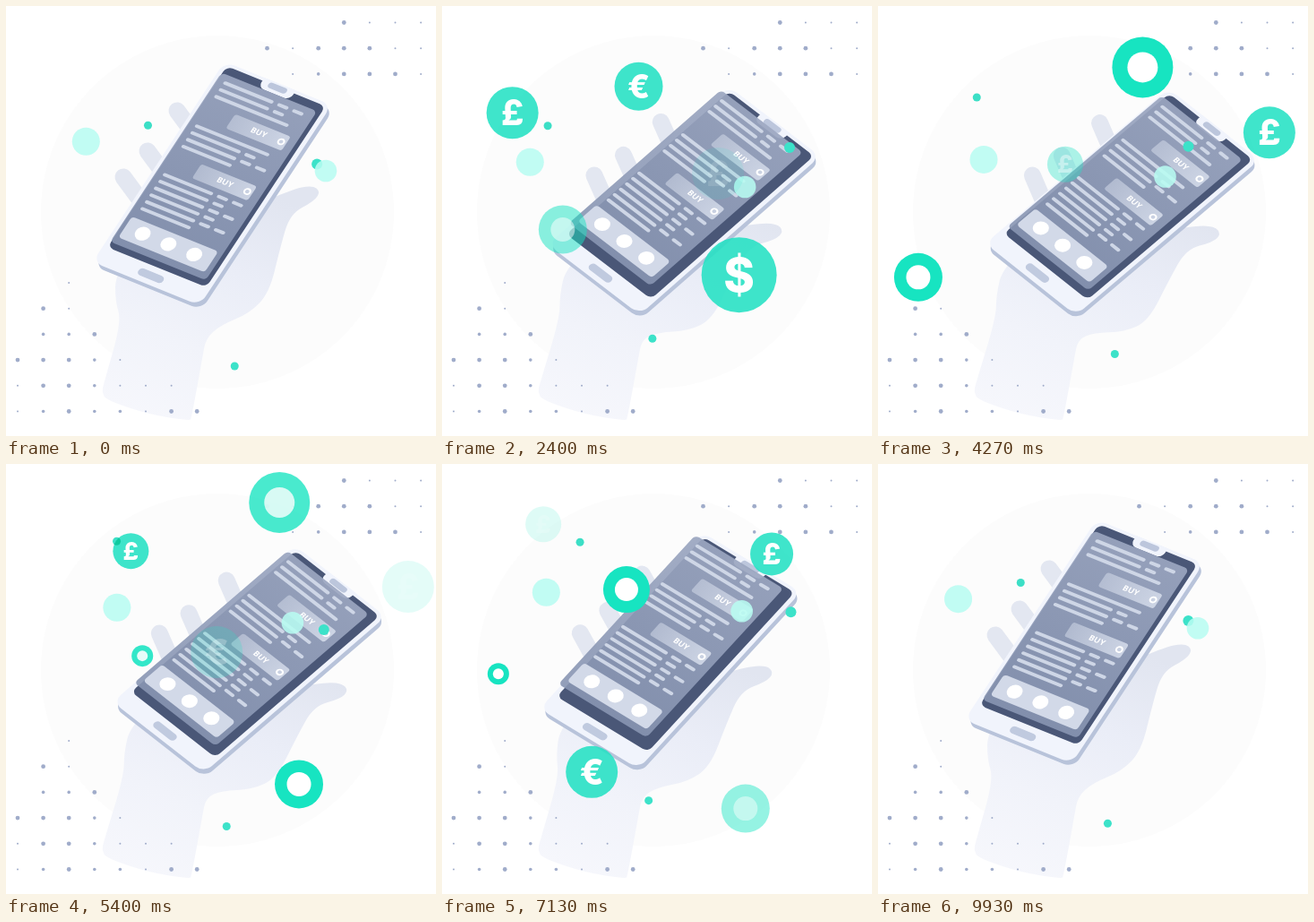
These frames come from a looping animation (480 by 480 pixels, 9.99 s). An HTML page with a canvas:

```html
<!DOCTYPE html>
<html lang="en">
<head>
<meta charset="utf-8">
<title>Phone and coins</title>
<style>
  html, body { margin: 0; width: 100%; height: 100%; overflow: hidden; background: #fff; }
  canvas { display: block; width: 480px; height: 480px; }
</style>
</head>
<body>
<canvas id="stage" width="480" height="480"></canvas>
<script>
const ctx = document.getElementById('stage').getContext('2d');
const LOOP = 9990, TAU = Math.PI * 2, DEG = Math.PI / 180;
const WRIST = { x: 160, y: 370, tilt: 12.5 * DEG };
const GRIP = { x: 180, y: 356, tilt: 15.6 * DEG };

// key poses [ms, value], joined by sine easing
const TILT = [[0, 0], [1700, 1.08], [3250, .86], [4600, 1.08], [LOOP, 0]];
const LIFT = [[0, 0], [1500, 8], [4600, 2.5], [6500, 9], [LOOP, 0]];

// coins fly from one point to another and slow down on the way
const LIFE = 3350, TRAVEL = 3600, FADE_IN = 400, FADE_OUT = 700;
const coin = (glyph, r, start, from, to) => ({ glyph, r, start, from, to });
const COINS = [
  coin('£', 29, 270, [211, 162], [69, 116]),
  coin('€', 27, 0, [207, 160], [220, 87]),
  coin('$', 42, 800, [238, 180], [351, 325]),
  coin('', 27, 2000, [176, 225], [38, 307]),
  coin('£', 29, 2150, [274, 199], [449, 137]),
  coin('', 34, 2600, [237, 219], [306, 41]),
  coin('£', 20, 3900, [246, 219], [113, 67]),
  coin('', 27, 4100, [293, 279], [339, 385]),
  coin('', 12, 4850, [215, 200], [55, 236]),
  coin('€', 29, 5100, [258, 165], [159, 360]),
  coin('£', 24, 5700, [229, 227], [407, 65]),
  coin('', 26, 6300, [225, 266], [190, 35])
];

// centre, path radius, start angle, turns per loop, dot radius
const orbit = (x, y, path, start, turns, r) => ({ x, y, path, start, turns, r });
const ORBITS = [
  orbit(246, 386, 18.5, 60, 2, 4.5),
  orbit(367, 166, 22.5, 152, -2, 6),
  orbit(338, 183, 19, 3, 1, 12.3),
  orbit(106, 158, 18, 202, -1, 15.5)
];
const TOP_ORBIT = orbit(138, 112, 29.5, 46, 1, 4.5);

// a digit is a dot size
const DOTS_TOP = ['   3111', '3133311', ' 123331'];
const DOTS_BOTTOM = ['  1', ' 31', ' 223', '33321', '1332111', '12322133'];
const DOT_R = [0, 1, 1.8, 2.4];

const HAND = [
  [165, 235], [122, 298], [122, 330], [129, 352], [109, 422], [107, 431], [112, 440],
  [160, 456], [205, 463], [207, 460], [219, 394], [223, 371], [240, 356], [272, 343],
  [294, 320], [306, 270], [317, 232], [344, 218], [351, 207], [342, 200], [318, 205], [250, 235]
];
const FINGERTIPS = [[191, 117], [158, 162], [131, 191]];

// first row and rows of a text block: a digit counts dashes, '-' is one long line
const TEXT = [[22.5, '21-'], [80, '-120'], [145, '212120']];
const ROW = 9.1;

const clamp = v => Math.min(1, Math.max(0, v));
const mix = (a, b, p) => a + (b - a) * p;

function ease(keys, t) {
  const i = Math.max(1, keys.findIndex(k => k[0] >= t));
  const [t0, a] = keys[i - 1], [t1, b] = keys[i];
  return mix(a, b, (1 - Math.cos(Math.PI * (t - t0) / (t1 - t0))) / 2);
}

function disc(x, y, r, fill) {
  ctx.fillStyle = fill;
  ctx.beginPath();
  ctx.arc(x, y, r, 0, TAU);
  ctx.fill();
}

function box(x, y, w, h, r, fill) {
  ctx.fillStyle = fill;
  ctx.beginPath();
  ctx.roundRect(x, y, w, h, r);
  ctx.fill();
}

function line(x0, y0, x1, y1, width, stroke) {
  ctx.strokeStyle = stroke;
  ctx.lineWidth = width;
  ctx.lineCap = 'round';
  ctx.beginPath();
  ctx.moveTo(x0, y0);
  ctx.lineTo(x1, y1);
  ctx.stroke();
}

function label(text, x, y, font) {
  ctx.fillStyle = '#fff';
  ctx.font = font;
  ctx.textAlign = 'center';
  ctx.fillText(text, x, y);
}

function gradient(x0, y0, x1, y1, ...colors) {
  const g = ctx.createLinearGradient(x0, y0, x1, y1);
  colors.forEach((c, i) => g.addColorStop(i / (colors.length - 1), c));
  return g;
}

function turned(pivot, amount, draw) {
  ctx.save();
  ctx.translate(pivot.x, pivot.y);
  ctx.rotate(pivot.tilt * amount);
  ctx.translate(-pivot.x, -pivot.y);
  draw();
  ctx.restore();
}

// the slanted plane of the phone
function plane(dx, dy, draw) {
  ctx.save();
  ctx.transform(.927, .375, -.55, .835, 244 + dx, 62 + dy);
  draw();
  ctx.restore();
}

function drawDots(rows, x, y) {
  rows.forEach((row, j) => [...row].forEach((size, i) =>
    disc(x + i * 28.6, y + j * 28.7, DOT_R[+size], '#a0acca')));
}

// the forearm stays put, the rest turns around the wrist
function bend([x, y], tilt) {
  const a = WRIST.tilt * tilt * clamp((375 - y) / 40);
  const c = Math.cos(a), s = Math.sin(a), dx = x - WRIST.x, dy = y - WRIST.y;
  return [WRIST.x + dx * c - dy * s, WRIST.y + dx * s + dy * c];
}

function drawHand(tilt) {
  const pts = HAND.map(p => bend(p, tilt));
  ctx.fillStyle = gradient(270, 200, 160, 462, '#e1e5f0', '#eaedf7', '#f1f3fa', '#f6f7fc');
  ctx.beginPath();
  for (let i = 0; i <= pts.length; i++) {
    const [x, y] = pts[i % pts.length], [nx, ny] = pts[(i + 1) % pts.length];
    const mid = [(x + nx) / 2, (y + ny) / 2];
    if (i) ctx.quadraticCurveTo(x, y, ...mid);
    else ctx.moveTo(...mid);
  }
  ctx.fill();
  turned(WRIST, tilt, () => FINGERTIPS.forEach(([x, y]) => line(x, y, x + 28, y + 38, 19, '#e3e7f1')));
}

function drawPhone() {
  plane(2, 5, () => box(0, 0, 129, 268, 12, '#b8c3da'));
  plane(0, 0, () => {
    box(0, 0, 129, 268, 12, '#f1f4fc');
    box(5, 4, 119, 242, 7, '#4a5777');
    box(48, 0, 38, 13, [0, 0, 7, 7], '#f1f4fc');
    box(56, 2, 22, 7, 3.5, '#bcc6dc');
    box(49, 253, 30, 9, 4.5, '#c0cadf');
  });
}

function drawButton(x, y) {
  box(x, y, 67, 19, 3, gradient(x, 0, x + 67, 0, 'rgba(215,222,236,.5)', 'rgba(215,222,236,.85)'));
  label('BUY', x + 34, y + 12.3, '700 9px "Open Sans", sans-serif');
  ctx.strokeStyle = '#fff';
  ctx.lineWidth = 2;
  ctx.beginPath();
  ctx.arc(x + 61, y + 9.5, 3.2, 0, TAU);
  ctx.stroke();
}

function drawScreen() {
  box(4, 13, 115, 226, 5, gradient(0, 13, 0, 239, 'rgba(155,166,192,.92)', 'rgba(136,149,178,.9)'));
  for (const [top, rows] of TEXT) {
    [...rows].forEach((kind, i) => {
      const y = top + i * ROW;
      line(14, y, kind === '-' ? 99 : 70, y, 4, '#ced6e6');
      for (let n = 0; n < +kind; n++) line(79 + n * 18, y, 88 + n * 18, y, 4, '#ced6e6');
    });
  }
  drawButton(43, 51);
  drawButton(42, 118);
  box(9, 203, 104, 28, 4, '#d2d9e8');
  for (let i = 0; i < 3; i++) disc(30 + i * 31, 216.7, 8.3, '#fff');
}

function drawOrbit(o, t) {
  const a = o.start * DEG + o.turns * TAU * t / LOOP;
  disc(o.x + o.path * Math.cos(a), o.y + o.path * Math.sin(a), o.r,
    o.r > 10 ? 'rgba(184,252,241,.87)' : '#3ce2c9');
}

function drawCoin({ glyph, r, start, from, to }, t) {
  const age = t - start;
  if (age < 0 || age > LIFE) return;
  const p = 1 - Math.pow(1 - age / TRAVEL, 3);
  const x = mix(from[0], to[0], p), y = mix(from[1], to[1], p);
  ctx.globalAlpha = clamp((age - 200) / FADE_IN) * clamp((LIFE - age) / FADE_OUT);
  disc(x, y, r, glyph ? 'rgba(35,226,196,.87)' : '#17e4c1');
  if (glyph) {
    const size = r * (glyph === '$' ? 1.25 : 1.35);
    label(glyph, x, y + size * .36, `800 ${size}px Inter, sans-serif`);
  } else {
    disc(x, y, r * .5, '#fff');
  }
  ctx.globalAlpha = 1;
}

function draw(t) {
  const tilt = ease(TILT, t), lift = ease(LIFT, t);
  ctx.fillStyle = '#fff';
  ctx.fillRect(0, 0, 480, 480);
  disc(236, 230, 197, '#fcfcfc');
  drawHand(tilt);
  drawDots(DOTS_TOP, 291.5, 18.5);
  drawDots(DOTS_BOTTOM, 13, 309);
  turned(GRIP, tilt, drawPhone);
  ctx.save();
  ctx.translate(-lift / 4, -lift);
  turned(GRIP, tilt, () => plane(0, 0, drawScreen));
  ctx.restore();
  ORBITS.forEach(o => drawOrbit(o, t));
  COINS.forEach(c => drawCoin(c, t));
  ctx.globalCompositeOperation = 'multiply';
  drawOrbit(TOP_ORBIT, t);
  ctx.globalCompositeOperation = 'source-over';
}

function frame() {
  draw(performance.now() % LOOP);
  requestAnimationFrame(frame);
}
frame();
</script>
</body>
</html>
```
